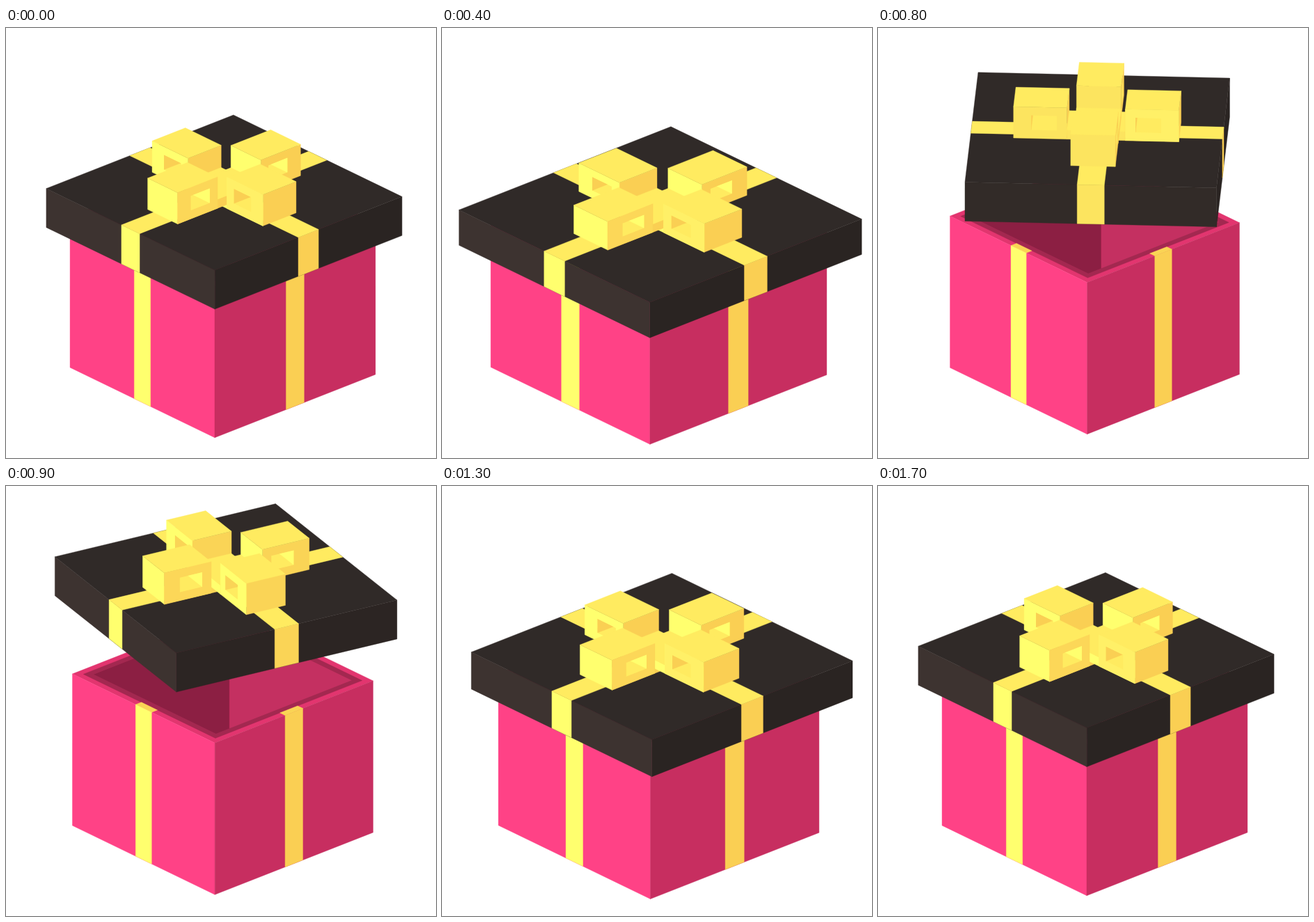
These frames come from a looping animation (618x618 px, 1.8 s). An HTML page with a canvas:

```html
<!DOCTYPE html>
<html lang="en">
<head>
<meta charset="utf-8">
<title>Gift box</title>
<style>
html, body { margin: 0; width: 100%; height: 100%; overflow: hidden; background: #fff; }
canvas { display: block; width: 618px; height: 618px; }
</style>
</head>
<body>
<canvas id="stage" width="618" height="618"></canvas>
<script>
const ctx = document.getElementById('stage').getContext('2d');
const LOOP = 1800, STEP = 100, TILT = 0.4364, REST = 48;

// Shades: top, then the range from the shaded right side to the lit left side
const DARK = { top: '#302a28', lo: [42, 36, 34], hi: [61, 51, 48] };
const GOLD = { top: '#ffeb60', lo: [250, 207, 83], hi: [255, 255, 110] };
const PINK = { left: '#ff4286', right: '#c72e60', rim: '#e2356f', lip: '#a32850', inL: '#8c1f43', inR: '#c43061' };

const inOut = u => (1 - Math.cos(Math.PI * u)) / 2;
const out = u => Math.sin(Math.PI * u / 2);

// Key: [time, value, easing towards this key]
const KEYS = {
  body: [[0, 1], [400, 1.1], [600, 0.895], [1000, 1], [1200, 1], [1400, 1.1], [1700, 1], [1800, 1]],
  lid: [[0, 1], [400, 1.132], [600, 1], [1000, 1], [1400, 1.084], [1700, 1], [1800, 1]],
  x: [[0, 313.5], [600, 313.9], [1000, 316.5], [1400, 316], [1700, 313.5], [1800, 313.5]],
  y: [[0, 236.5], [400, 268], [1000, 128, out], [1400, 265], [1700, 236], [1800, 236.5]],
  turn: [[0, REST], [600, REST], [1000, REST - 90], [1800, REST - 90]]
};

function at(keys, t) {
  let i = 1;
  while (i < keys.length - 1 && t > keys[i][0]) i++;
  const [t0, v0] = keys[i - 1], [t1, v1, ease = inOut] = keys[i];
  return v0 + (v1 - v0) * ease((t - t0) / (t1 - t0));
}

function trace(pts) {
  ctx.beginPath();
  pts.forEach(p => ctx.lineTo(p[0], p[1]));
  ctx.closePath();
}

function fill(color, pts) {
  trace(pts);
  ctx.fillStyle = ctx.strokeStyle = color;
  ctx.lineWidth = 0.4;
  ctx.fill();
  ctx.stroke();
}

// Projects (a, c, h): two ground axes turned by deg, and a height in pixels
function view(cx, cy, size, deg, tall) {
  const r = deg * Math.PI / 180, co = Math.cos(r) * size, si = Math.sin(r) * size;
  return (a, c, h = 0) => [cx + a * co + c * si, cy + (a * si - c * co) * TILT - h * tall];
}

function shade(mat, deg) {
  const d = ((deg % 360) + 360) % 360;
  const t = Math.pow(Math.min(1, Math.max(0, (d - 48) / 90)), 1.2);
  return `rgb(${mat.lo.map((v, i) => Math.round(v + (mat.hi[i] - v) * t))})`;
}

// The four upright sides: outward axis and the angle it adds to the turn
const SIDES = [
  { n: [1, 0], add: 0 }, { n: [0, -1], add: 90 },
  { n: [-1, 0], add: 180 }, { n: [0, 1], add: 270 }
];
const facing = deg => Math.sin(deg * Math.PI / 180) > 1e-6;

function flat(p, color, a0, a1, c0, c1, h) {
  fill(color, [p(a0, c0, h), p(a1, c0, h), p(a1, c1, h), p(a0, c1, h)]);
}

function wall(p, color, a0, c0, a1, c1, h0, h1) {
  fill(color, [p(a0, c0, h0), p(a1, c1, h0), p(a1, c1, h1), p(a0, c0, h1)]);
}

function block(p, mat, deg, [a0, a1, c0, c1], h0, h1) {
  for (const { n, add } of SIDES) {
    if (!facing(deg + add)) continue;
    const color = shade(mat, deg + add);
    if (n[0]) { const a = n[0] > 0 ? a1 : a0; wall(p, color, a, c0, a, c1, h0, h1); }
    else { const c = n[1] > 0 ? c1 : c0; wall(p, color, a0, c, a1, c, h0, h1); }
  }
  flat(p, mat.top, a0, a1, c0, c1, h1);
}

const NEAR = 0.232, FAR = 0.657, HALF = 0.1775, HIGH = 45;

// One bow loop lying along axis n, hollow from side to side
function loop(p, deg, { n, add }) {
  const q = (u, v, h) => p(n[0] * u - n[1] * v, n[1] * u + n[0] * v, h);
  const ends = n.map(k => k ? [k * NEAR, k * FAR].sort((a, b) => a - b) : [-HALF, HALF]);
  block(p, GOLD, deg, ends.flat(), 0, HIGH);
  const u0 = NEAR + 0.19 * (FAR - NEAR), u1 = NEAR + 0.67 * (FAR - NEAR);
  const h0 = 12, h1 = 33;
  for (const s of [-1, 1]) {
    if (!facing(deg + add - 90 * s)) continue;
    const v = HALF * s;
    const hole = [q(u0, v, h0), q(u1, v, h0), q(u1, v, h1), q(u0, v, h1)];
    if (facing(deg + add)) {
      const soft = s < 0 ? '#fff067' : '#fcd758';
      if (Math.abs(Math.cos((deg + add) * Math.PI / 180)) > 0.5) wall2(q, soft, v);
    }
    ctx.save();
    trace(hole);
    ctx.clip();
    fill(GOLD.top, hole);
    const [u, ang] = facing(deg + add) ? [u0, deg + add] : [u1, deg + add + 180];
    fill(shade(GOLD, ang), [q(u, v, h0), q(u, -v, h0), q(u, -v, h1), q(u, v, h1)]);
    ctx.restore();
  }
}

function wall2(q, color, v) {
  fill(color, [q(NEAR, v, 0), q(FAR, v, 0), q(FAR, v, HIGH), q(NEAR, v, HIGH)]);
}

const BAND = 0.108;

function drawLid(t) {
  const s = at(KEYS.lid, t), tall = 1 - 0.69 * (s - 1), deg = at(KEYS.turn, t);
  const p = view(at(KEYS.x, t), at(KEYS.y, t), 181 * s, deg, tall);
  block(p, DARK, deg, [-1, 1, -1, 1], -56, 0);
  for (const { n, add } of SIDES) {
    if (!facing(deg + add)) continue;
    const [a, c] = n;
    wall(p, shade(GOLD, deg + add), a - c * BAND, c + a * BAND, a + c * BAND, c - a * BAND, -56, 0);
  }
  flat(p, GOLD.top, -1, 1, -BAND, BAND, 0);
  flat(p, GOLD.top, -BAND, BAND, -1, 1, 0);

  const depth = side => Math.sin((deg + side.add) * Math.PI / 180);
  const order = [...SIDES].sort((a, b) => depth(a) - depth(b));
  const knot = () => {
    block(p, GOLD, deg, [-NEAR, NEAR, -HALF, HALF], 0, 13);
    block(p, GOLD, deg, [-HALF, HALF, -NEAR, NEAR], 0, 13);
  };
  order.filter(o => depth(o) < 0).forEach(o => loop(p, deg, o));
  knot();
  order.filter(o => depth(o) >= 0).forEach(o => loop(p, deg, o));
}

function drawBody(t) {
  const p = view(311.5, 493, 155.4 * at(KEYS.body, t), REST, 1);
  const H = 218, RIM = 0.927, LIP = 0.858, W = 0.112;
  const ring = (color, k) => flat(p, color, -k, k, -k, k, H);
  ring(PINK.rim, 1);
  ring(PINK.lip, RIM);

  // Inside: the two far walls meet at the back corner
  ctx.save();
  trace([p(-LIP, -LIP, H), p(LIP, -LIP, H), p(LIP, LIP, H), p(-LIP, LIP, H)]);
  ctx.clip();
  wall(p, PINK.inL, -LIP, -LIP, -LIP, LIP, 0, H);
  wall(p, PINK.inR, -LIP, LIP, LIP, LIP, 0, H);
  ctx.restore();

  wall(p, PINK.left, -1, -1, 1, -1, 0, H);
  wall(p, PINK.right, 1, -1, 1, 1, 0, H);
  flat(p, '#fad455', -W, W, -1, -RIM, H);
  flat(p, '#fad455', RIM, 1, -W, W, H);
  wall(p, shade(GOLD, 138), -W, -1, W, -1, 0, H);
  wall(p, shade(GOLD, 48), 1, -W, 1, W, 0, H);
}

function draw(now) {
  const t = Math.floor((now % LOOP) / STEP) * STEP;
  ctx.fillStyle = '#fff';
  ctx.fillRect(0, 0, 618, 618);
  drawBody(t);
  drawLid(t);
}

let start;
function tick(now) {
  if (start === undefined) start = now;
  draw(now - start);
  requestAnimationFrame(tick);
}
draw(0);
requestAnimationFrame(tick);
</script>
</body>
</html>
```
